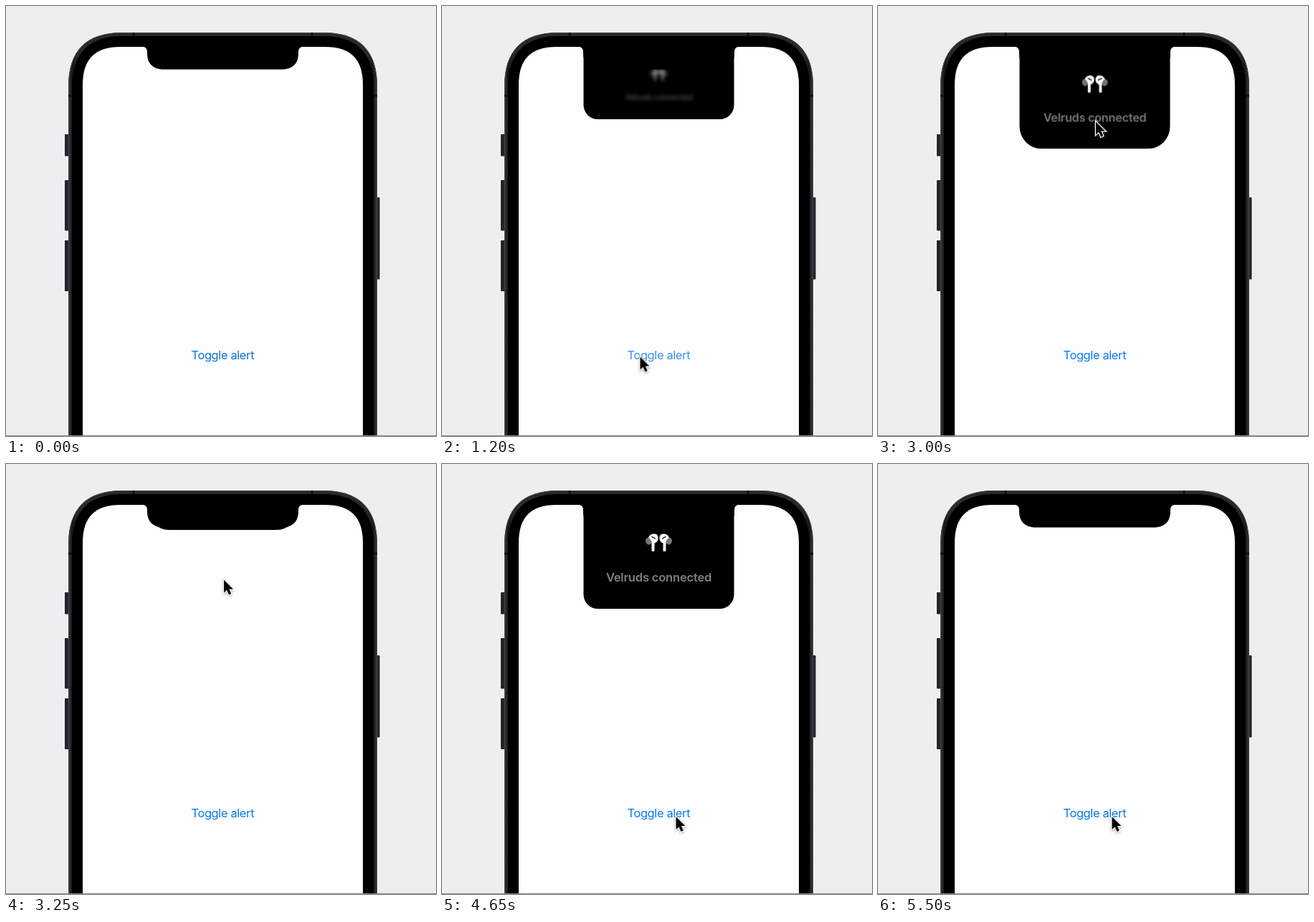
Animation, 600 px wide and 600 px high, one loop 5.55 s. Source, as an HTML page:

```html
<!DOCTYPE html>
<html lang="en">
<head>
<meta charset="utf-8">
<title>Notch alert</title>
<style>
html, body { margin: 0; width: 100%; height: 100%; overflow: hidden; background: #efedf0; }
svg { display: block; width: 100vw; height: 100vh; }
text { font-family: Inter, "Open Sans", sans-serif; font-size: 16.5px; text-anchor: middle; }

.panel, .content, .label, .cursor { animation: 5550ms infinite; }

.panel { animation-name: grow, corners; animation-timing-function: cubic-bezier(.25, .35, .25, 1), linear; }
@keyframes grow {
  0%, 18.919% { transform: translateY(0); }
  27.928%, 53.964% { transform: translateY(114px); }
  60.36%, 72.973% { transform: translateY(0); }
  81.982%, 86.126% { transform: translateY(114px); }
  92.793%, 100% { transform: translateY(0); }
}
@keyframes corners {
  0%, 18.919% { rx: 32px; }
  20.72%, 53.153% { rx: 20px; }
  54.05%, 72.973% { rx: 31px; }
  74.775%, 85.225% { rx: 20px; }
  86.126%, 100% { rx: 32px; }
}

.content {
  transform-origin: 302.5px 72px;
  animation-name: reveal;
  animation-timing-function: cubic-bezier(.25, .35, .25, 1);
}
@keyframes reveal {
  0%, 18.919% { transform: scale(.06); opacity: 0; filter: blur(10px); }
  27.928%, 53.964% { transform: scale(1); opacity: 1; filter: blur(0); }
  60.36%, 72.973% { transform: scale(.06); opacity: 0; filter: blur(10px); }
  81.982%, 86.126% { transform: scale(1); opacity: 1; filter: blur(0); }
  92.793%, 100% { transform: scale(.06); opacity: 0; filter: blur(10px); }
}

.label { letter-spacing: -.4px; animation-name: tap; animation-timing-function: linear; }
@keyframes tap {
  0%, 1.8% { fill: #1272d2; }
  10.8%, 17.95% { fill: #0a78ea; }
  18% { fill: #b4d8f2; }
  18.919% { fill: #a4cef0; }
  21.622% { fill: #3c92e6; }
  27.928%, 71.95% { fill: #0b7bf0; }
  72%, 72.1% { fill: #b4d8f2; }
  75.676% { fill: #3c92e6; }
  81.982%, 84.685% { fill: #0b7bf0; }
  86.036% { fill: #b4d8f2; }
  89.64% { fill: #3c92e6; }
  96%, 100% { fill: #0a78e4; }
}

.cursor { animation-name: move, show; animation-timing-function: ease-in-out, step-end; }
@keyframes move {
  0%, 1.8% { transform: translate(301px, 568px); animation-timing-function: ease-out; }
  10.811%, 38.739% { transform: translate(276.5px, 489.5px); }
  50.45%, 58.559% { transform: translate(304px, 161.5px); }
  67.117% { transform: translate(326.5px, 514px); }
  68.468%, 80.721% { transform: translate(326.5px, 508.5px); }
  83.243%, 100% { transform: translate(326.5px, 492px); }
}
@keyframes show {
  0% { opacity: 0; }
  1.8%, 100% { opacity: 1; }
}
</style>
</head>
<body>
<svg viewBox="0 0 600 600">
  <defs>
    <linearGradient id="edge" x1="87" x2="518" y1="0" y2="0" gradientUnits="userSpaceOnUse">
      <stop offset="0" stop-color="#3b3a40"/>
      <stop offset=".012" stop-color="#17171b"/>
      <stop offset=".03" stop-color="#29282d"/>
      <stop offset=".97" stop-color="#29282d"/>
      <stop offset=".988" stop-color="#17171b"/>
      <stop offset="1" stop-color="#3b3a40"/>
    </linearGradient>
    <clipPath id="below"><rect y="56" width="600" height="544"/></clipPath>
    <g id="bud">
      <ellipse cx="288.3" cy="107.6" rx="4.2" ry="5" fill="#777" transform="rotate(-20 288.3 107.6)"/>
      <path d="M288 103C289 99 293 97 297 97.500C300.500 98 302 101 301.500 104.500C301 108 299 109.500 296.500 110.500V120.500Q296.500 122 295 122H294Q292.500 122 292.500 120.500V110.500C292.500 107 291 104.500 288 103Z" fill="#fff"/>
      <path d="M293 101.500L297.500 104" stroke="#000" stroke-width="1.4" stroke-linecap="round"/>
    </g>
  </defs>

  <rect width="600" height="600" fill="#efedf0"/>

  <g fill="#252429">
    <rect x="82" y="179" width="6" height="30.500" rx="1"/>
    <rect x="82" y="243" width="6" height="70.500" rx="1"/>
    <rect x="82" y="327" width="6" height="71" rx="1"/>
    <rect x="516" y="267" width="5.500" height="114.500" rx="1"/>
  </g>

  <path d="M87 620V112C87 62 112 37 162 37H443C493 37 518 62 518 112V620Z" fill="url(#edge)"/>
  <path d="M87.500 620V112C87.500 62.500 112.500 37.500 162 37.500H443C492.500 37.500 517.500 62.500 517.500 112V620" fill="none" stroke="#46454b"/>
  <path d="M178 37v5M427 37v5M87 125h5M513 125h5" stroke="#111115" stroke-width="3"/>
  <path d="M92 620V112C92 66 116 42 162 42H443C489 42 513 66 513 112V620Z"/>
  <path d="M107 620V110C107 74 124 57 160 57H445C481 57 498 74 498 110V620Z" fill="#fefdff"/>

  <g clip-path="url(#below)">
    <rect class="panel" x="197.500" y="-112" width="210" height="200" rx="32"/>
  </g>
  <g class="content">
    <use href="#bud"/>
    <use href="#bud" transform="matrix(-1 0 0 1 605 0)"/>
    <text x="302.500" y="164" fill="#808080" font-weight="600" letter-spacing="-.18">Velruds connected</text>
  </g>
  <path d="M190 56.500Q197 57 197 64V66C197 80 205 88.500 220 88.500H385C400 88.500 408 80 408 66V64Q408 57 415 56.500Z"/>

  <text class="label" x="302.300" y="492.500">Toggle alert</text>
  <rect y="599" width="600" height="1" fill="#858487"/>

  <g class="cursor">
    <path d="M0 0V18L4 14.200L7 21L10.200 19.600L7.400 13H13Z" stroke="#fff" stroke-width="2.600" paint-order="stroke" style="filter: drop-shadow(0 1px 1.500px rgba(0, 0, 0, .35))"/>
  </g>
</svg>
</body>
</html>
```
